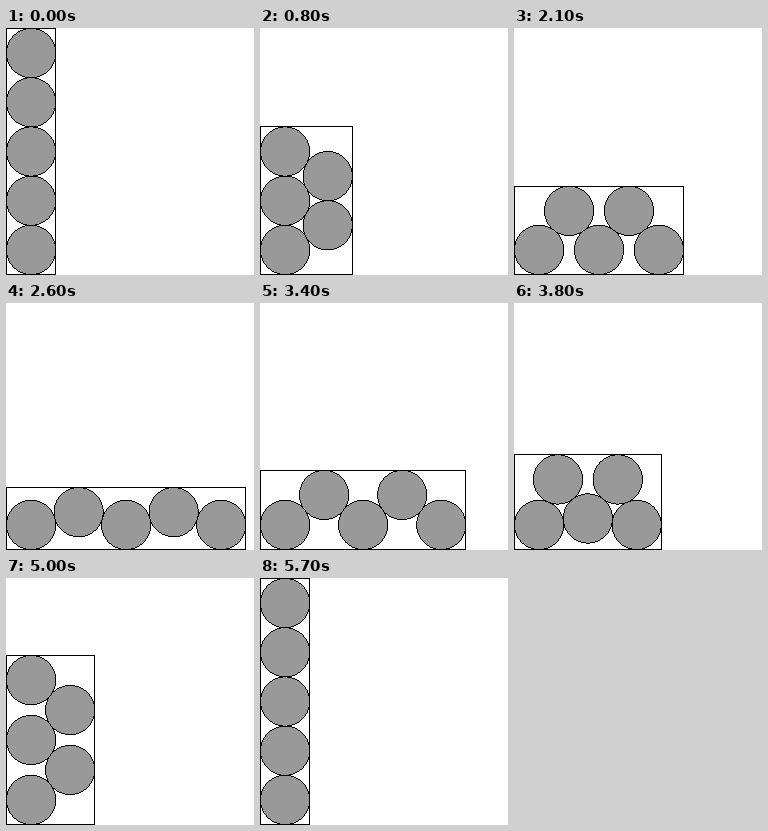
An HTML page with a canvas for the animation above (5800 ms loop, 248 by 247 pixels).

```html
<!DOCTYPE html>
<html lang="en">
<head>
<meta charset="utf-8">
<title>Five circles in a rectangle</title>
<style>
  html, body { margin: 0; width: 248px; height: 247px; overflow: hidden; background: #fff; }
  canvas { display: block; }
</style>
</head>
<body>
<canvas id="stage" width="248" height="247"></canvas>
<script>
const ctx = document.getElementById('stage').getContext('2d');
const D = 49.2;            // circle diameter in pixels
const R = D / 2;
const BASE = 246;          // y of the bottom edge
const STEP_MS = 100;
const LAST = 28;           // steps from upright to flat
const TURN = 7.5 * Math.PI / 180;
const { sin, cos, sqrt, round, ceil, floor, max, PI, SQRT1_2 } = Math;

// Circle centres in diameters, relative to the lower left circle.
function upright(k) {
  if (k <= 8) {            // column folds into a zigzag
    const a = k * TURN;
    return [0, 1, 2, 3, 4].map(i => [i % 2 * sin(a), i * cos(a)]);
  }
  if (k <= 12) {           // middle circle swings between the two pairs
    const a = (k - 8) * TURN, top = 2 * cos(a);
    const x = sin(PI / 3 + a), y = cos(PI / 3 + a);
    return [[0, 0], [0, top], [sin(a), cos(a)], [x, y], [x, top - y]];
  }
  // four corners around a centre circle
  const a = PI / 3 - (k - 12) * TURN;
  const x = cos(a), y = sin(a);
  return [[0, 0], [2 * x, 0], [0, 2 * y], [2 * x, 2 * y], [x, y]];
}

// The second half mirrors the first across the diagonal.
function pose(k) {
  return k <= LAST / 2 ? upright(k) : upright(LAST - k).map(([x, y]) => [y, x]);
}

const toPixels = ([x, y]) => [R + x * D, BASE - R - y * D];
const dot = (x, y) => ctx.fillRect(round(x), round(y), 1, 1);

// Half the chord of the circle at distance d from its centre.
const chord = d => sqrt(max(0, R * R - d * d));

function fill([cx, cy]) {
  for (let y = ceil(cy - R); y <= cy + R; y++) {
    const s = chord(y - cy), left = round(cx - s);
    ctx.fillRect(left, y, round(cx + s) - left + 1, 1);
  }
}

// One-pixel line: step columns across top and bottom, rows along the sides.
function outline([cx, cy]) {
  const reach = R * SQRT1_2;
  for (let x = round(cx - reach); x <= round(cx + reach); x++) {
    const s = chord(x - cx);
    dot(x, cy - s);
    dot(x, cy + s);
  }
  for (let y = round(cy - reach); y <= round(cy + reach); y++) {
    const s = chord(y - cy);
    dot(cx - s, y);
    dot(cx + s, y);
  }
}

function draw(k) {
  const points = pose(k);
  const centres = points.map(toPixels);
  const right = round((max(...points.map(p => p[0])) + 1) * D);
  const top = round(BASE - (max(...points.map(p => p[1])) + 1) * D);

  ctx.fillStyle = '#fff';
  ctx.fillRect(0, 0, 248, 247);
  ctx.fillStyle = '#999';
  centres.forEach(fill);
  ctx.fillStyle = '#000';
  centres.forEach(outline);
  ctx.strokeStyle = '#000';
  ctx.lineWidth = 1;
  ctx.strokeRect(0.5, top + 0.5, right, BASE - top);
}

const start = performance.now();
let shown = -1;

function tick() {
  const n = floor(max(0, performance.now() - start) / STEP_MS) % (2 * LAST + 2);
  const k = n <= LAST ? n : 2 * LAST + 1 - n;   // each end holds for two steps
  if (k !== shown) draw(shown = k);
  requestAnimationFrame(tick);
}
tick();
</script>
</body>
</html>
```
